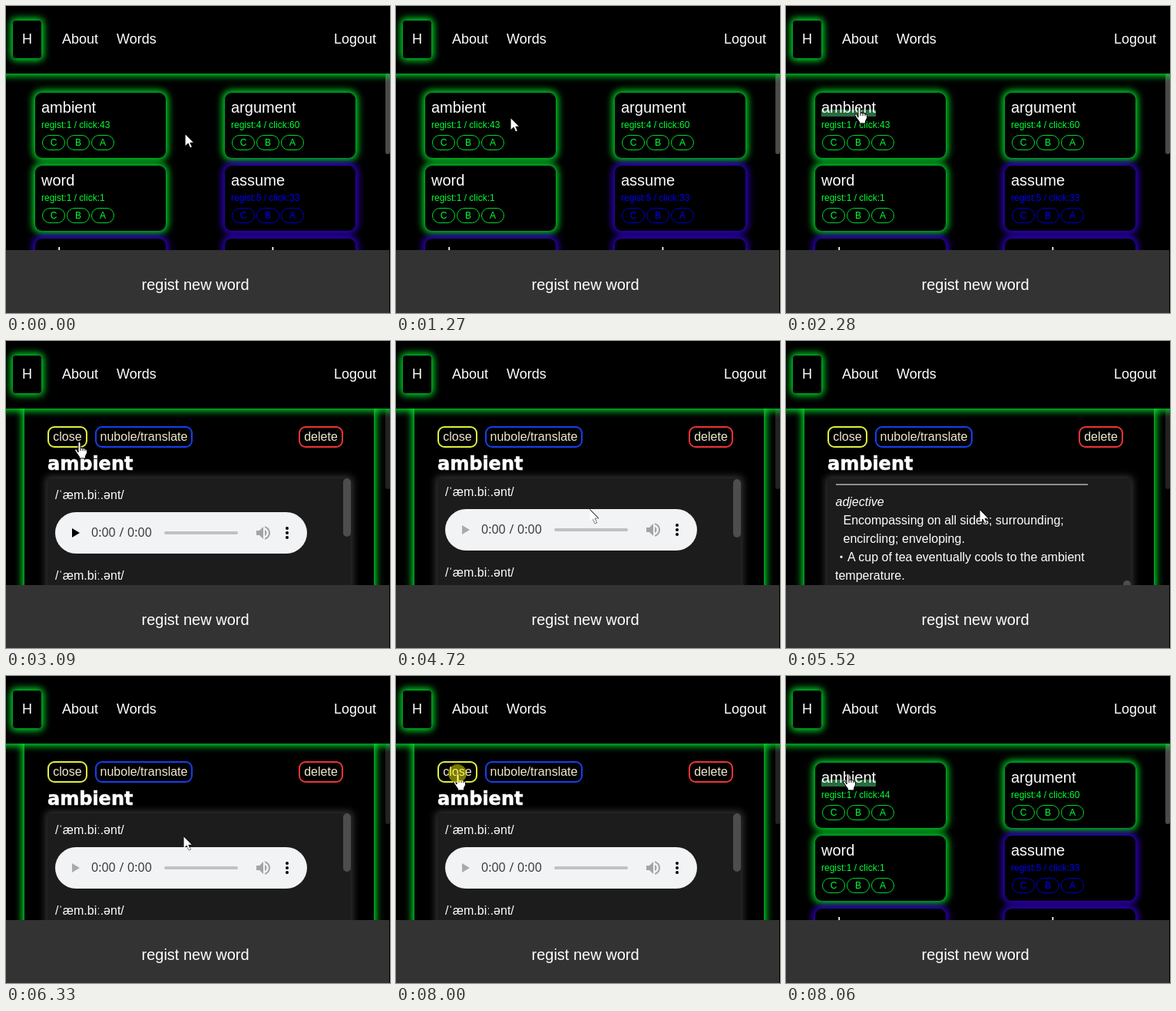
Write an HTML page that moves like this. It is 500 by 400 pixels and loops after 8880 ms.

```html
<!DOCTYPE html>
<html lang="en">
<head>
<meta charset="utf-8">
<title>Word list</title>
<style>
html, body { margin: 0; width: 100%; height: 100%; overflow: hidden; background: #000; }
svg { display: block; width: 500px; height: 400px; }
text { font-family: "Liberation Sans", Arial, "Noto Sans CJK JP", sans-serif; white-space: pre; }
.time { font-family: "Open Sans", "Noto Sans", sans-serif; word-spacing: .6px; }
.head { font-family: "DejaVu Sans", sans-serif; font-weight: bold; stroke: #fff; stroke-width: .6px; }
.italic { font-style: italic; }
</style>
</head>
<body>
<svg id="stage" viewBox="0 0 500 400"></svg>
<script>
const LOOP = 8880, OPEN = 3090, LOADED = 3490, CLOSE = 8060;
const GREEN = '#00e02a', LIME = '#00ff33', VIOLET = '#3400d8', BLUE = '#0000f0';

const text = (x, y, size, str, fill = '#fff', extra = '') =>
  `<text x="${x}" y="${y}" font-size="${size}" fill="${fill}" ${extra}>${str}</text>`;
const box = (x, y, w, h, r, fill, extra = '') =>
  `<rect x="${x}" y="${y}" width="${w}" height="${h}" rx="${r}" fill="${fill}" ${extra}/>`;
const glow = (x, y, w, h, r, color, fill = '#000') =>
  box(x - 3, y - 3, w + 6, h + 6, r + 3, color, 'filter="url(#blur)"') + box(x, y, w, h, r, fill);

function card(col, row, word, regist, click, hot, id = '') {
  const x = 38 + col * 247, y = 113 + row * 95, ink = hot ? LIME : BLUE;
  const pills = ['C', 'B', 'A'].map((c, i) => {
    const px = x + 9.5 + i * 32;
    return box(px, y + 55.5, 29, 19, 9.5, 'none', `stroke="${hot ? '#00d92b' : '#0000c8'}"`) +
      text(px + 14.5, y + 69, 12, c, ink, 'text-anchor="middle"');
  }).join('');
  return glow(x, y, 170, 85, 9, hot ? GREEN : VIOLET) +
    (id && box(46, 135, 71, 9, 0, '#2a6b40', 'id="mark"')) +
    text(x + 8, y + 26, 20, word) +
    text(x + 8, y + 46, 12, `regist:${regist} / click:${click}`, ink, id) + pills;
}

const button = (x, w, label, color) =>
  box(x + 1, 112, w - 2, 26, 8, '#000', `stroke="${color}" stroke-width="2"`) +
  text(x + w / 2, 130, 16, label, '#f0e8cc', 'text-anchor="middle"');

const player = y => `<g transform="translate(0 ${y})">` +
  text(64, 206, 16, '/ˈæm.biː.ənt/') +
  box(64, 223, 328, 54, 27, '#f1f3f4') +
  '<path class="play" d="M86 244v12l10-6z"/>' +
  text(111, 255, 16, '0:00 / 0:00', '#333', 'class="time"') +
  box(206, 248, 96, 4, 2, '#bfc1c3') +
  `<path transform="translate(323 238)" fill="#a2a4a6" d="M3 9v6h4l5 5V4L7 9zM16.5 12c0-1.8-1-3.3-2.5-4v8c1.5-.7 2.5-2.2 2.5-4z
    M14 3.2v2.1c2.9.9 5 3.5 5 6.7s-2.1 5.9-5 6.7v2.1c4-.9 7-4.5 7-8.8s-3-7.9-7-8.8z"/>` +
  [244, 250, 256].map(cy => `<circle cx="366" cy="${cy}" r="2"/>`).join('') + '</g>';

const entry = box(65, 606.5, 328, 1, 0, '#fff') + [
  [64.5, 'adjective', 'class="italic"'],
  [74.5, 'Encompassing on all sides; surrounding;'],
  [74.5, 'encircling; enveloping.'],
  [64, '・A cup of tea eventually cools to the ambient'],
  [64, 'temperature.']
].map(([x, str, extra], i) => text(x, 635 + i * 24, 16, str, '#fff', extra)).join('');

const stage = document.getElementById('stage');
stage.innerHTML = `
<defs>
  <filter id="blur" filterUnits="userSpaceOnUse" x="-60" y="-60" width="620" height="520"
    color-interpolation-filters="sRGB"><feGaussianBlur stdDeviation="5"/></filter>
  <clipPath id="pane"><rect x="54" y="179" width="395" height="139"/></clipPath>
</defs>
<rect width="500" height="400"/>
<g id="list">
  ${card(0, 0, 'ambient', 1, 43, true, 'id="count"')}
  ${card(1, 0, 'argument', 4, 60, true)}
  ${card(0, 1, 'word', 1, 1, true)}
  ${card(1, 1, 'assume', 5, 33, false)}
  ${card(0, 2, 'color', 2, 8, false)}
  ${card(1, 2, 'record', 3, 21, false)}
</g>
<g id="detail">
  ${glow(24, 60, 455, 320, 0, GREEN)}
  ${button(54, 52, 'close', '#e2f03c')}
  ${button(116, 127, 'nubole/translate', '#1440f0')}
  ${button(381, 58, 'delete', '#f03434')}
  ${text(54, 168, 24, 'ambient', '#fff', 'class="head"')}
  ${glow(54, 179, 395, 209, 3, '#333', '#1c1c1c')}
  <g clip-path="url(#pane)">
    <g id="content">${[0, 105, 210, 315].map(player).join('')}${entry}</g>
    ${box(439, 179, 10, 76, 5, '#4d4d4d', 'id="thumb"')}
  </g>
</g>
${box(494, 88, 6, 105, 3, '#4a4a4a', 'id="bar"')}
${box(0, 318, 499, 82, 0, '#333')}
${text(176.5, 370, 20, 'regist new word')}
${glow(-40, -40, 580, 128, 0, GREEN)}
${glow(9, 19, 37, 49, 4, GREEN)}
${text(21, 49, 18, 'H')}${text(73, 49, 18, 'About')}
${text(144, 49, 18, 'Words')}${text(427, 49, 18, 'Logout')}
<g id="cursor">
  <g id="arrow">
    <path fill="#fff" d="M.6 1.6V16l3.6-3.5 2.7 6 2-.9-2.5-5.7h4.7z"/>
    <path fill="none" stroke="#000" d="M.5.5l11 11.2"/>
    <path fill="none" stroke="#000" stroke-dasharray="1 1" d="M11.5 12H7l2.6 5.8-2.6 1.2-2.8-6"/>
  </g>
  <g id="hand" stroke="#000">
    <path fill="#fff" d="M-1 14V2a1.5 1.5 0 0 1 3 0V8l2 .3 3 .6 2 1q1.5.8 1.5 2v3l-2 4v3h-8v-2l-3.5-5-2.2-3.5q-.3-1.8 1.7-1.7z"/>
    <path fill="none" d="M2 8v4M5 8.5v3.5M8 9.3v3"/>
  </g>
  <circle id="press" r="12" fill="#ff0" opacity=".47"/>
</g>`;

const el = {};
for (const node of stage.querySelectorAll('[id]')) el[node.id] = node;
const plays = stage.querySelectorAll('.play');
const show = (node, on) => node.setAttribute('visibility', on ? 'inherit' : 'hidden');

// Pointer moves: start, last step, step count, end point.
const START = [233, 166];
const moves = [
  [930, 1610, 11, 95, 131],
  [3760, 4180, 7, 252, 219],
  [6330, 6940, 10, 80, 127]
];
const scrolls = [
  [0, 0], [4720, 4], [4780, 110], [4850, 260], [4920, 380], [4990, 424],
  [5520, 420], [5590, 270], [5660, 80], [5730, 0]
];

function pointer(t) {
  let [x, y] = START;
  for (const [from, to, n, ex, ey] of moves) {
    if (t < from) break;
    const step = Math.min(n, Math.floor((t - from) / (to - from) * (n - 1) + 1e-6) + 1);
    const p = step / n, k = p * (1.25 - .25 * p);
    x += (ex - x) * k;
    y += (ey - y) * k;
  }
  return [Math.round(x), Math.round(y)];
}

function draw(t) {
  const open = t >= OPEN && t < CLOSE;
  const [x, y] = pointer(t);
  const hand = x < 117 && y < 145;
  const top = scrolls.filter(s => s[0] <= t).pop()[1];

  show(el.list, !open);
  show(el.detail, open);
  show(el.mark, hand);
  show(el.hand, hand);
  show(el.arrow, !hand);
  show(el.press, (t >= 2140 && t < 2280) || (t >= 8000 && t < CLOSE));
  el.cursor.setAttribute('transform', `translate(${x} ${y})`);
  el.content.setAttribute('transform', `translate(0 ${-top})`);
  el.thumb.setAttribute('y', 179 + Math.round(top * 133 / 420));
  el.bar.setAttribute('fill', open ? '#222' : '#4a4a4a');
  el.count.textContent = `regist:1 / click:${t < OPEN ? 43 : 44}`;
  for (const p of plays) p.setAttribute('fill', t < LOADED ? '#000' : '#a8aaac');
}

const began = performance.now();
function tick() {
  draw((performance.now() - began) % LOOP);
  requestAnimationFrame(tick);
}
tick();
</script>
</body>
</html>
```
